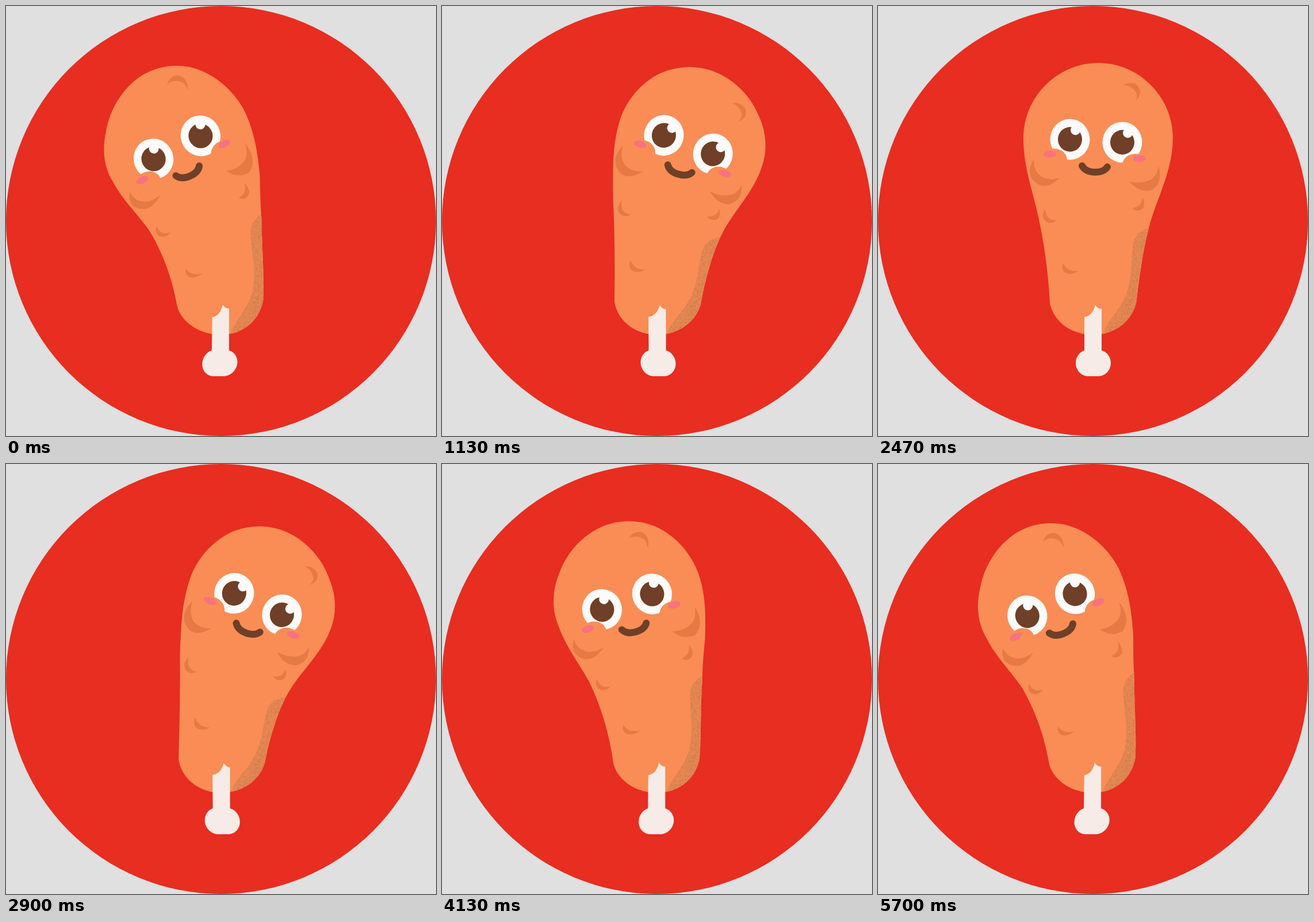
Write an HTML page with a canvas that moves like this. It is 748 by 748 pixels and loops after 5730 ms.

```html
<!DOCTYPE html>
<html lang="en">
<head>
<meta charset="utf-8">
<title>Swaying drumstick</title>
<style>
html, body { margin: 0; width: 100%; height: 100%; overflow: hidden; background: #e0e0e0; }
canvas { display: block; }
</style>
</head>
<body>
<canvas id="stage" width="748" height="748"></canvas>
<script>
const ctx = document.getElementById('stage').getContext('2d');
const LOOP = 5730, SWAY = 58, AXIS = 374, BASE = 560, CURVE = 0.00135;
const SKIN = '#f98d55', BUMP = '#e57a45', BROWN = '#6f3f27', WHITE = '#fcfbfa', PINK = '#f8727f';

const BODY = 'M253 230 C253 195 267 162 291 138 C316 113 349 99 383 99 C417 99 451 113 475 138 ' +
  'C499 162 513 195 513 230 C513 265 502 297 490 330 C481 353 475 370 470 391 C461 425 456 465 452 493 ' +
  'C451 503 450 509 449 517 C440 552 408 572 374 572 C340 572 306 552 299 517 ' +
  'C296 460 288 404 276 354 C265 308 253 275 253 230Z';
const SHADE = 'M480 385 C458 387 445 398 443 420 C440 445 442 480 429 508 C417 534 400 545 388 576 L470 576 Z';
const BUMPS = [
  'M426 138 Q438 130 450 137 Q462 149 449 165 Q453 152 446 146 Q438 137 426 138',
  'M271 267 Q259 285 268 301 Q288 326 316 299 Q296 305 283 296 Q270 285 271 267',
  'M438 305 Q452 324 474 321 Q497 309 488 278 Q486 294 476 301 Q458 311 438 305',
  'M442 352 Q451 360 461 352 Q466 343 460 333 Q459 343 454 347 Q448 351 442 352',
  'M291 353 Q284 363 289 372 Q298 382 311 373 Q301 373 296 368 Q291 362 291 353',
  'M322 447 Q318 456 324 463 Q335 470 349 461 Q338 462 331 458 Q324 453 322 447'
].join(' ');
const MOUTH = 'M355 278 Q361 289 378 289 Q393 289 399 280';
const BONE = 'M359 541 C368 540 375 533 378 520 C381 524 384 527 389 527 L389 599 C399 602 405 611 405 621 ' +
  'C405 634 395 644 383 644 L366 644 C354 644 344 634 344 621 C344 611 350 602 359 599Z';

// Seeded grain for the shaded side
let seed = 7;
const random = () => (seed = seed * 16807 % 2147483647) / 2147483647;
const grain = Array.from({ length: 1400 }, () => ({
  x: 385 + random() * 90, y: 385 + random() * 190, dark: random() < 0.5
}));

let lean = 0;

// Bends the upright pose along a circular arc above BASE; the bone end only slides
function warp(x, y) {
  const height = BASE - y;
  if (height < 0) return { x: x + lean * 2.1 * (height / 60) ** 2, y, turn: 0 };
  const bend = lean * CURVE || 1e-9;
  const turn = bend * height;
  const side = x - AXIS;
  return {
    x: AXIS + (1 - Math.cos(turn)) / bend + side * Math.cos(turn),
    y: BASE - Math.sin(turn) / bend + side * Math.sin(turn),
    turn
  };
}

function shape(d) {
  return new Path2D(d.replace(/(\d+) (\d+)/g, (_, x, y) => {
    const p = warp(+x, +y);
    return p.x.toFixed(2) + ' ' + p.y.toFixed(2);
  }));
}

function fill(path, color) {
  ctx.fillStyle = color;
  ctx.fill(path);
}

function oval(x, y, rx, ry, color) {
  const p = warp(x, y);
  ctx.fillStyle = color;
  ctx.beginPath();
  ctx.ellipse(p.x, p.y, rx, ry, p.turn, 0, 7);
  ctx.fill();
}

function eye(x, y, lidX, lidY) {
  oval(x, y, 34.5, 35.5, WHITE);
  oval(x, y, 21, 21.5, BROWN);
  oval(x + 9.5, y - 16, 8.5, 8.5, WHITE);
  oval(lidX, lidY, 23, 20, SKIN);
}

function drawShade(body) {
  ctx.save();
  ctx.clip(body);
  const shade = shape(SHADE);
  ctx.clip(shade);
  fill(shade, '#e08551');
  for (const g of grain) {
    const p = warp(g.x, g.y);
    ctx.fillStyle = g.dark ? '#cf7e50' : '#ef8a54';
    ctx.fillRect(p.x, p.y, 2, 2);
  }
  ctx.restore();
}

function draw(now) {
  const frame = Math.min(171, Math.floor((now % LOOP + 7) * 0.03));
  lean = -Math.cos(2 * Math.PI * frame / SWAY) - 0.162;

  ctx.fillStyle = '#e0e0e0';
  ctx.fillRect(0, 0, 748, 748);
  ctx.fillStyle = '#e82d21';
  ctx.beginPath();
  ctx.arc(374, 374, 374, 0, 7);
  ctx.fill();

  const body = shape(BODY);
  fill(body, SKIN);
  drawShade(body);
  fill(shape(BUMPS), BUMP);

  eye(334, 232, 306, 268);
  eye(425, 237, 448, 277);
  oval(299, 257.5, 11, 6, PINK);
  oval(455, 265.5, 11, 6, PINK);

  ctx.strokeStyle = BROWN;
  ctx.lineWidth = 12;
  ctx.lineCap = 'round';
  ctx.stroke(shape(MOUTH));

  fill(shape(BONE), '#f6ebe6');
}

function tick(now) {
  draw(now);
  requestAnimationFrame(tick);
}
draw(0);
requestAnimationFrame(tick);
</script>
</body>
</html>
```
